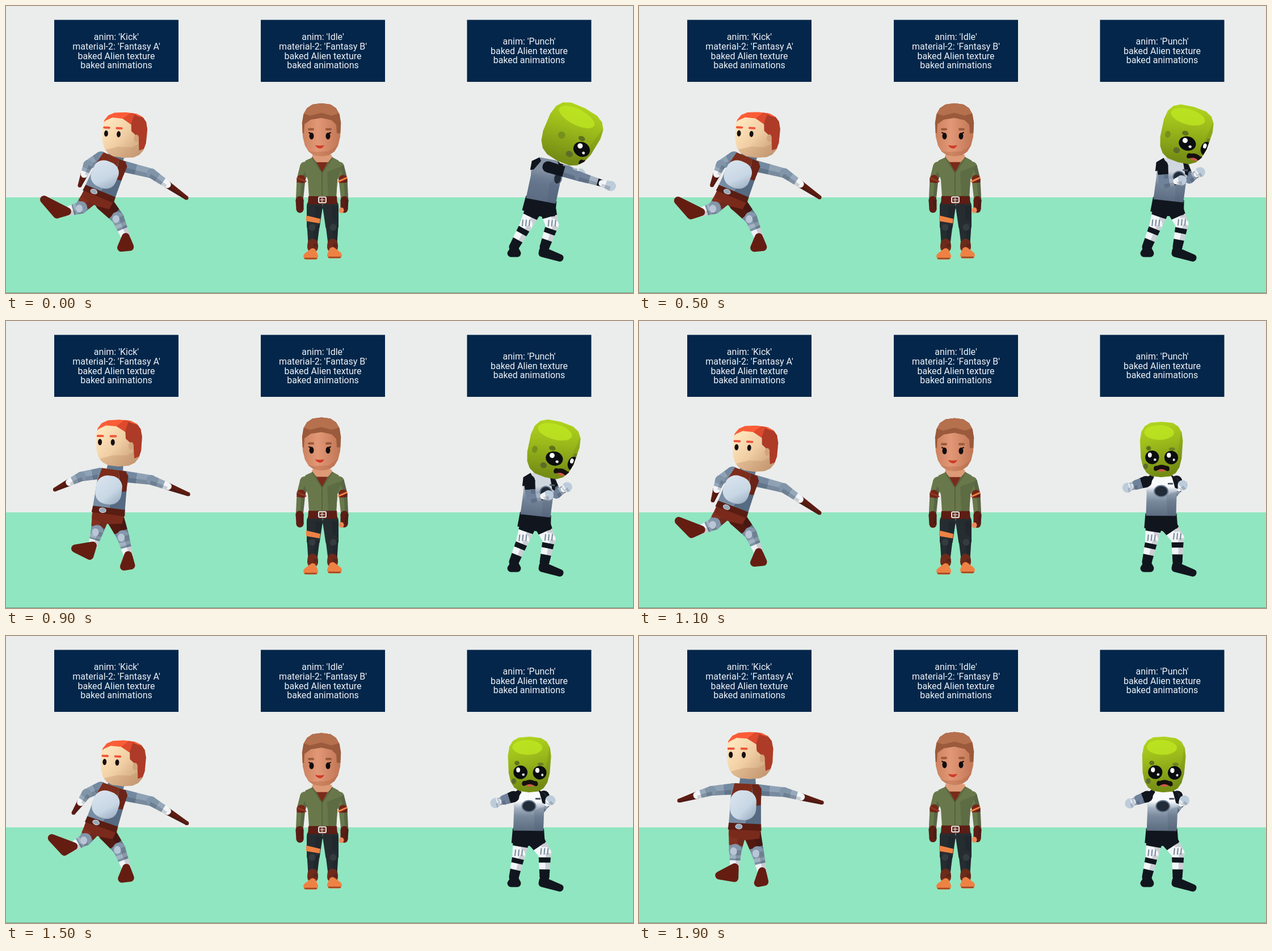
Animation, 1105 px wide and 507 px high, one loop 2000 ms. Source, as an HTML page:

```html
<!DOCTYPE html>
<html lang="en">
<head>
<meta charset="utf-8">
<title>Baked animations</title>
<style>
html, body { margin: 0; width: 100%; height: 100%; overflow: hidden; background: #ebedec; }
svg { display: block; width: 100%; height: 100%; }
text { font: 16px Roboto, sans-serif; fill: #eef2f7; text-anchor: middle; }
</style>
</head>
<body>
<svg viewBox="0 0 1105 507">
  <defs>
    <linearGradient id="suit" x1="0" y1="0" x2="0" y2="1">
      <stop offset=".3" stop-color="#f8fafc"/><stop offset=".46" stop-color="#a3b1c0"/>
      <stop offset=".65" stop-color="#7a8a9d"/><stop offset="1" stop-color="#5c6c80"/>
    </linearGradient>
    <linearGradient id="plate" x1="0" y1="0" x2="1" y2="1">
      <stop offset="0" stop-color="#dbe6f0"/><stop offset=".6" stop-color="#c8d7e5"/><stop offset="1" stop-color="#93a6bb"/>
    </linearGradient>
    <linearGradient id="skin" x1="0" y1="0" x2="1" y2=".8">
      <stop offset=".2" stop-color="#fde4bb"/><stop offset=".55" stop-color="#f0cda3"/><stop offset="1" stop-color="#c59a74"/>
    </linearGradient>
    <linearGradient id="lime" x1="0" y1="0" x2=".2" y2="1">
      <stop offset="0" stop-color="#b4da1e"/><stop offset=".45" stop-color="#9cbb1b"/><stop offset="1" stop-color="#758d15"/>
    </linearGradient>
    <linearGradient id="tan" x1="0" y1="0" x2="1" y2="0">
      <stop offset="0" stop-color="#cb815e"/><stop offset=".4" stop-color="#e29876"/><stop offset="1" stop-color="#bf7553"/>
    </linearGradient>
  </defs>
  <rect width="1105" height="507" fill="#ebedec"/>
  <rect y="338" width="1105" height="169" fill="#90e6c0"/>
  <rect y="506" width="1105" height="1" fill="#6f9c8c"/>
  <g id="signs"></g>
  <g id="kicker"></g>
  <g id="idler"></g>
  <g id="puncher"></g>
</svg>
<script>
const $ = id => document.getElementById(id);
const poly = (pts, fill, more = '') => `<polygon points="${pts}" fill="${fill}" ${more}/>`;
const oval = (x, y, rx, ry, fill, more = '') => `<ellipse cx="${x}" cy="${y}" rx="${rx}" ry="${ry}" fill="${fill}" ${more}/>`;
const line = (d, color, w) => `<path d="${d}" fill="none" stroke="${color}" stroke-width="${w}" stroke-linecap="round"/>`;
const group = (transform, body) => `<g transform="${transform}">${body}</g>`;
const lerp = (a, b, k) => a.map((v, i) => v + (b[i] - v) * k);
const mix = (p, q, k) => Object.fromEntries(Object.keys(p).map(n => [n, lerp(p[n], q[n], k)]));
const ease = (t, from, to) => {
  const k = Math.min(1, Math.max(0, (t - from) / (to - from)));
  return k * k * (3 - 2 * k);
};

// Elbow or knee: a point on a-b pushed sideways.
function joint(a, b, bend, at = .5) {
  const dx = b[0] - a[0], dy = b[1] - a[1], len = Math.hypot(dx, dy) || 1;
  return [a[0] + dx * at - dy / len * bend, a[1] + dy * at + dx / len * bend];
}

// Tapered segment with colour bands given as [start, colour].
function limb(a, b, wa, wb, bands) {
  const at = (t, s) => joint(a, b, (wa + (wb - wa) * t) / 2 * s, t).map(v => v.toFixed(1));
  const strip = (t, u, s, v, fill, more) => poly([at(t, s), at(u, s), at(u, v), at(t, v)], fill, more);
  const side = a[1] - b[1] + b[0] - a[0] > 0 ? 1 : -1;
  const ends = oval(...a, wa / 2, wa / 2, bands[0][1]) + oval(...b, wb / 2, wb / 2, bands[bands.length - 1][1]);
  return ends + bands.map(([t, c], i) => strip(t, i + 1 < bands.length ? bands[i + 1][0] : 1, 1, -1, c)).join('') +
    strip(0, 1, side * .15, side, '#0a1226', 'opacity=".17"');
}

const shoe = (ankle, heel, toe, color, w = 14) =>
  poly([ankle, heel, toe], color, `stroke="${color}" stroke-width="${w}" stroke-linejoin="round"`);

// Faceted squarish skull; taper narrows the chin.
function skull(rx, ry, taper, power = 2.9, count = 18) {
  const bulge = v => Math.sign(v) * Math.abs(v) ** (2 / power);
  return Array.from({ length: count }, (_, i) => {
    const a = (i + .5) / count * 2 * Math.PI, y = bulge(Math.sin(a));
    return [(rx * bulge(Math.cos(a)) * (1 - taper * y)).toFixed(1), (ry * y).toFixed(1)];
  }).join(' ');
}
const headOf = (id, shape, fill, body) =>
  `<clipPath id="${id}"><polygon points="${shape}"/></clipPath>` + poly(shape, fill) + `<g clip-path="url(#${id})">${body}</g>`;

// The trunk is drawn in a frame that runs 76 units from neck to belt.
function trunk(top, low, body) {
  const dx = low[0] - top[0], dy = low[1] - top[1];
  return group(`translate(${top}) rotate(${Math.atan2(-dx, dy) * 180 / Math.PI}) scale(1 ${Math.hypot(dx, dy) / 76})`, body);
}
const onTrunk = (top, low, x, y) => joint(top, low, -x, y / 76);

function sign(x, first, lines) {
  return `<rect x="${x}" y="24.500" width="219" height="109.500" fill="#03264a"/>` +
    lines.map((s, i) => `<text x="${x + 109.5}" y="${first + i * 16.8}">${s}</text>`).join('');
}
const baked = ['baked Alien texture', 'baked animations'];
$('signs').innerHTML =
  sign(85, 60, ["anim: 'Kick'", "material-2: 'Fantasy A'", ...baked]) +
  sign(449, 60, ["anim: 'Idle'", "material-2: 'Fantasy B'", ...baked]) +
  sign(812.5, 67.8, ["anim: 'Punch'", ...baked]);

// ---- Kick: three key poses, blended ----
// head: x, y, tilt, size; hands: x, y, bend; feet: ankle, toe, bend
const stand = {
  head: [193, 208, 0, 1], neck: [190, 261], belt: [191, 338],
  handL: [60, 286, 4], handR: [323, 286, -4],
  footL: [180, 417, 155, 438, 3], footR: [218, 417, 211, 438, 0]
};
const lunge = {
  head: [166, 202, 0, 1.07], neck: [165, 261], belt: [160, 340],
  handL: [49, 291, 8], handR: [308, 298, -6],
  footL: [127, 421, 97, 457, 5], footR: [211, 410, 203, 427, 0]
};
const high = {
  head: [209, 228, 3, .96], neck: [192, 268], belt: [165, 332],
  handL: [130, 317, 10], handR: [318, 339, -11],
  footL: [108, 363, 67, 342, -7], footR: [211, 408, 203, 427, -6]
};

const boot = '#651d12';
function kickLeg(hip, [ax, ay, tx, ty, bend], shorts) {
  const ankle = [ax, ay], knee = joint(hip, ankle, bend), heel = joint(knee, ankle, 0, 1 + 19 / Math.hypot(ax - knee[0], ay - knee[1]));
  return limb(hip, knee, 31, 22, [[0, shorts], [.74, '#70849a']]) +
    limb(knee, ankle, 22, 16, [[0, '#8497ab'], [.3, '#a2b2c2'], [.48, '#7d90a5'], [.6, '#eef2f6']]) +
    oval(knee[0] - 3, knee[1] + 2, 6, 7, '#b9c6d5') + shoe(ankle, heel, [tx, ty], boot);
}
function kickArm(shoulder, [x, y, bend]) {
  const hand = [x, y], elbow = joint(shoulder, hand, bend, .4), wrist = joint(elbow, hand, 0, .45);
  return limb(wrist, hand, 13, 7, [[0, '#5e1c12']]) +
    limb(shoulder, elbow, 20, 17, [[0, '#7389a0'], [.45, '#8fa2b5']]) +
    limb(elbow, wrist, 17, 13, [[0, '#8195a9'], [.4, '#97a9bb'], [.75, '#f2f5f8']]);
}
const kickTrunk =
  poly('-12,-16 14,-16 16,4 -14,4', '#60758b') +
  poly('-29,78 28,78 26,96 2,100 -27,95', '#7a2a1b') +
  poly('-22,-1 20,-1 26,7 25,40 28,72 -29,72 -27,7', '#788da3') +
  poly('6,36 26,30 28,72 0,72', '#566a82') +
  poly('-22,-1 8,-1 10,14 -8,20 -27,24', '#7d2d1b') +
  poly('8,-1 20,-1 26,7 26,36 15,38', '#6b2417') +
  '<rect x="-28" y="11" width="46" height="53" rx="20" fill="url(#plate)"/>' +
  poly('-29,70 28,70 29,82 -30,82', '#591d13') + oval(-11, 76, 6, 4.4, '#98a8b8', 'stroke="#cfd8e0"');

const kickFace = headOf('k', skull(41, 42, .05), 'url(#skin)',
  poly('-45,32 -10,22 14,22 45,6 45,45 -45,45', '#bd8e68', 'opacity=".35"') +
  poly('-45,-16 -36,-25 -24,-31 -5,-30 11,-22 45,-22 45,-45 -45,-45', '#fb5d38') +
  poly('-5,-30 13,-45 24,-33 11,-20', '#de4a2d') +
  poly('11,-22 16,-38 45,-30 45,20 28,27 26,4 12,-8', '#ad3b27')) +
  oval(22, 5, 4.5, 7, '#d3a47d') +
  [-34, -11].map(x => line(`M${x - 4} -12h9`, '#f0553b', 4) + oval(x, -1, 3.6, 5.7, '#170f10')).join('');

function drawKick(t) {
  const rise = ease(t, 280, 520);
  const step = mix(stand, lunge, 1 - ease(t, 175, 255));
  const p = mix(step, high, 1 - ease(t, 35, 165) + rise);
  const arms = mix(step, high, 1 - ease(t, 60, 200) + rise);
  const at = (x, y) => onTrunk(p.neck, p.belt, x, y);
  const [x, y, tilt, size] = p.head;
  return kickArm(at(-23, 9), arms.handL) + kickArm(at(20, 9), arms.handR) +
    kickLeg(at(13, 88), p.footR, '#521911') + kickLeg(at(-13, 88), p.footL, '#82301f') +
    trunk(p.neck, p.belt, kickTrunk) + group(`translate(${x} ${y}) rotate(${tilt}) scale(${size})`, kickFace);
}

// ---- Idle: mirrored limbs around x = 558 ----
const olive = '#69784b', pants = '#252d31', orange = '#ee8244', wine = '#5d1d14', rust = '#9a5a3b';
const bothSides = part => part(-1) + part(1);

const idleLegs = bothSides(s => {
  const hip = [558 + s * 14, 354], knee = [558 + s * 16.5, 388], ankle = [558 + s * 17.5, 420], y = s < 0 ? 2 : 0;
  return limb(hip, knee, 28, 23, [[0, pants]]) + limb(knee, ankle, 22, 16, [[0, pants]]) +
    oval(knee[0] + s * 2, 391, 6, 6, '#353c40') +
    limb(ankle, [ankle[0], 426], 18, 19, [[0, '#6e2a1a']]) +
    shoe([558 + s * 17.5, 432 + y], [558 + s * 14, 440 + y], [558 + s * 28, 440 + y], orange, 12) +
    line(`M${558 + s * 11} ${444 + y}h${s * 20}`, '#9c4a25', 2.5);
}) + poly('529,370 554,376 553,384 529,380', orange);

const idleTrunk = bothSides(s => {
  const x = d => 557 + s * d;
  return limb([x(30), 283], [x(37), 305], 18, 15, [[0, olive]]) +
    limb([x(37), 305], [x(39.5), 338], 15, 13, [[0, '#742617'], [.2, olive]]) +
    line(`M${x(29)} 309L${x(43)} 303`, s > 0 ? orange : '#8f3a22', 3) +
    limb([x(39.5), 342], [x(39), 358], 14, 13, [[0, wine]]);
}) + oval(591, 360, 4.5, 5, '#ed8a58') +
  poly('539,267 528,272 523,283 532,306 534,337 582,337 584,306 592,282 586,272 575,266', olive) +
  poly('566,292 592,282 584,306 582,337 568,337', '#5d6c43') +
  poly('540,262 574,262 575,267 558,284 539,267', '#dd9a76') + poly('547,275 567,275 557,293', '#7a2b1a') +
  line('M540 267L557 294L575 267M557 294V334', '#56633f', 1.8) +
  poly('533,335 583,335 584,349 532,349', wine) +
  '<rect x="551" y="336.500" width="13" height="10" rx="2" fill="#6d3020" stroke="#e4e6e6" stroke-width="2"/>' +
  line('M554 341.500h7m-4 -3v7', '#d5d8da', 1.3);

const idleHead = headOf('i', skull(34, 47, .07, 2.6), 'url(#tan)',
  poly('-40,34 -14,39 12,38 40,20 40,50 -40,50', '#a9623f', 'opacity=".35"') +
  poly('-40,6 -31,6 -30,-10 -19,-18 0,-21 18,-17 26,-9 27,6 40,6 40,-50 -40,-50', rust) +
  poly('-40,-50 40,-50 34,-30 18,-25 0,-30 -20,-25 -36,-30', '#b5704e')) +
  bothSides(s => {
    const x = d => s * d - 3;
    return line(`M${x(12)} -1h${s * 7}`, rust, 4) + oval(x(14.5), 11, 4, 6, '#130c0d') +
      line(`M${x(14)} 7l${s * 5} -2`, '#130c0d', 2);
  }) + '<path d="M-11 27Q-3 29 5 27Q2 33 -3 33Q-9 32 -11 27Z" fill="#cf3a27"/>';

function drawIdle(t) {
  const lift = Math.cos(t / 525 * 2 * Math.PI);
  return idleLegs + group(`translate(0 ${lift * .6 + .3})`, idleTrunk) + group(`translate(556 ${217.5 + lift * 1.3})`, idleHead);
}

// ---- Punch: everything follows one reach value, 0 guard to 1 hit ----
const ink = '#11161e', snow = '#f2f5f8', steel = '#70829a';
const reachAt = t => 1 - .42 * ease(t, 20, 78) - .58 * ease(t, 210, 300) + ease(t, 305, 380);

function punchArm(shoulder, hand, bend) {
  const elbow = joint(shoulder, hand, bend), wrist = joint(elbow, hand, 0, .72);
  return limb(shoulder, elbow, 20, 17, [[0, ink], [.5, steel]]) +
    limb(elbow, wrist, 17, 12, [[0, steel], [.45, '#a5b3c3'], [.8, ink]]) +
    limb(wrist, hand, 12, 18, [[0, snow], [.4, '#bdccda']]);
}
function punchLeg(hip, ankle, bend) {
  const knee = joint(hip, ankle, bend, .38);
  const ribs = [-6, 0, 6].map(o => line(`M${knee[0] + o} ${knee[1] - 8}l-1 10`, '#75879a', 2)).join('');
  return limb(hip, knee, 29, 23, [[0, ink], [.45, snow]]) +
    limb(knee, ankle, 22, 17, [[0, snow], [.18, ink], [.4, snow], [.68, ink]]) + ribs;
}
function punchTrunk(reach) {
  const body = '-28,4 -14,-5 14,-5 30,4 28,30 27,70 -26,70 -25,30', turn = reach * .97;
  return poly('-27,66 28,66 30,92 12,97 -8,97 -29,92', ink) + poly(body, 'url(#suit)') +
    poly(body, '#5b6d84', `opacity="${reach * reach * .75}"`) +
    poly('10,34 28,26 27,70 12,70', '#40526a', 'opacity=".2"') +
    poly('-28,4 -16,-5 -12,1 -22,18 -28,20', ink) + poly('30,4 16,-5 20,2 25,20 30,22', ink) +
    oval(27 * Math.sin(turn), 26, 12 * Math.cos(turn), 10, '#222b38', 'stroke="#66788d" stroke-width="2"') +
    `<rect x="${12 + 14 * turn}" y="11" width="9" height="3" fill="#4b5766"/>`;
}
function punchHead(reach) {
  const yaw = reach * .9;
  // A mark at angle a around the head.
  const mark = (a, y, rx, ry, fill) => {
    const w = Math.cos(yaw + a);
    return w > 0 ? oval(44 * Math.sin(yaw + a), y, rx * Math.max(.35, w), ry, fill) : '';
  };
  const eye = a => mark(a, 14, 13, 12, '#0c0d0f') + mark(a - .1, 10, 3.8, 4.3, '#fff') +
    mark(a + .12, 18, 2.4, 2.2, '#dfe6e8');
  const face = oval(-4, -30, 26, 13, '#c1e822', 'opacity=".75"') +
    poly('34,-30 45,-30 45,50 12,50 28,12', '#6b8412', 'opacity=".25"') +
    mark(-.55, -2, 5, 4, '#5f731c') + mark(.42, -1, 6, 3, '#6c8220') +
    mark(-.68, 30, 5, 5, '#5d6d2b') + mark(-1.15, 8, 5, 6, '#75901b') +
    eye(-.39) + eye(.39) +
    group(`translate(${44 * Math.sin(yaw)} 33) scale(${Math.cos(yaw)} 1)`,
      '<path d="M-14 2Q-14 -5 -8 -4Q0 -8 8 -4Q14 -5 14 2Q12 7 8 4Q0 0 -8 4Q-12 7 -14 2Z" fill="#17100e"/>' +
      '<path d="M-7 4Q0 -1 7 4Q0 8 -7 4Z" fill="#d4574c"/>');
  return group(`translate(${919 + 77 * reach} 227) rotate(${27 * reach}) scale(${1 + .32 * reach} ${1 + .07 * reach})`,
    headOf('p', skull(37, 49, .08, 3), 'url(#lime)', face));
}
function drawPunch(t) {
  const r = reachAt(t), waist = 919 + 22 * r, neck = [919 + 36 * r, 275], belt = [waist, 350];
  const left = onTrunk(neck, belt, -26 + 28 * r * r, 9), right = onTrunk(neck, belt, 28 - 12 * r, 8);
  const feet = shoe([896, 428], [901, 437], [890, 437], ink, 13) + shoe([946, 432], [945, 437], [976, 445], ink, 13);
  return feet + punchLeg([waist + 14, 361], [949, 426], -10) + punchLeg([waist - 12, 361], [895, 426], -1) +
    punchArm(right, [957 + 55 * r, 290 + 6 * r], 25 * (1 - r * r)) +
    trunk(neck, belt, punchTrunk(r)) +
    punchArm(left, [860 + 206 * r ** 1.4, 294 + 24 * r], 27 * Math.sin(Math.PI * r * r)) + punchHead(r);
}

// The scene advances in 100 ms steps, 20 to the loop.
const start = performance.now();
let shown = -1;
function draw() {
  const step = Math.floor((performance.now() - start) / 100) % 20;
  if (step !== shown) {
    const t = step * 100;
    shown = step;
    $('kicker').innerHTML = drawKick(t % 520);
    $('idler').innerHTML = drawIdle(t);
    $('puncher').innerHTML = drawPunch(t % 405);
  }
  requestAnimationFrame(draw);
}
draw();
</script>
</body>
</html>
```
